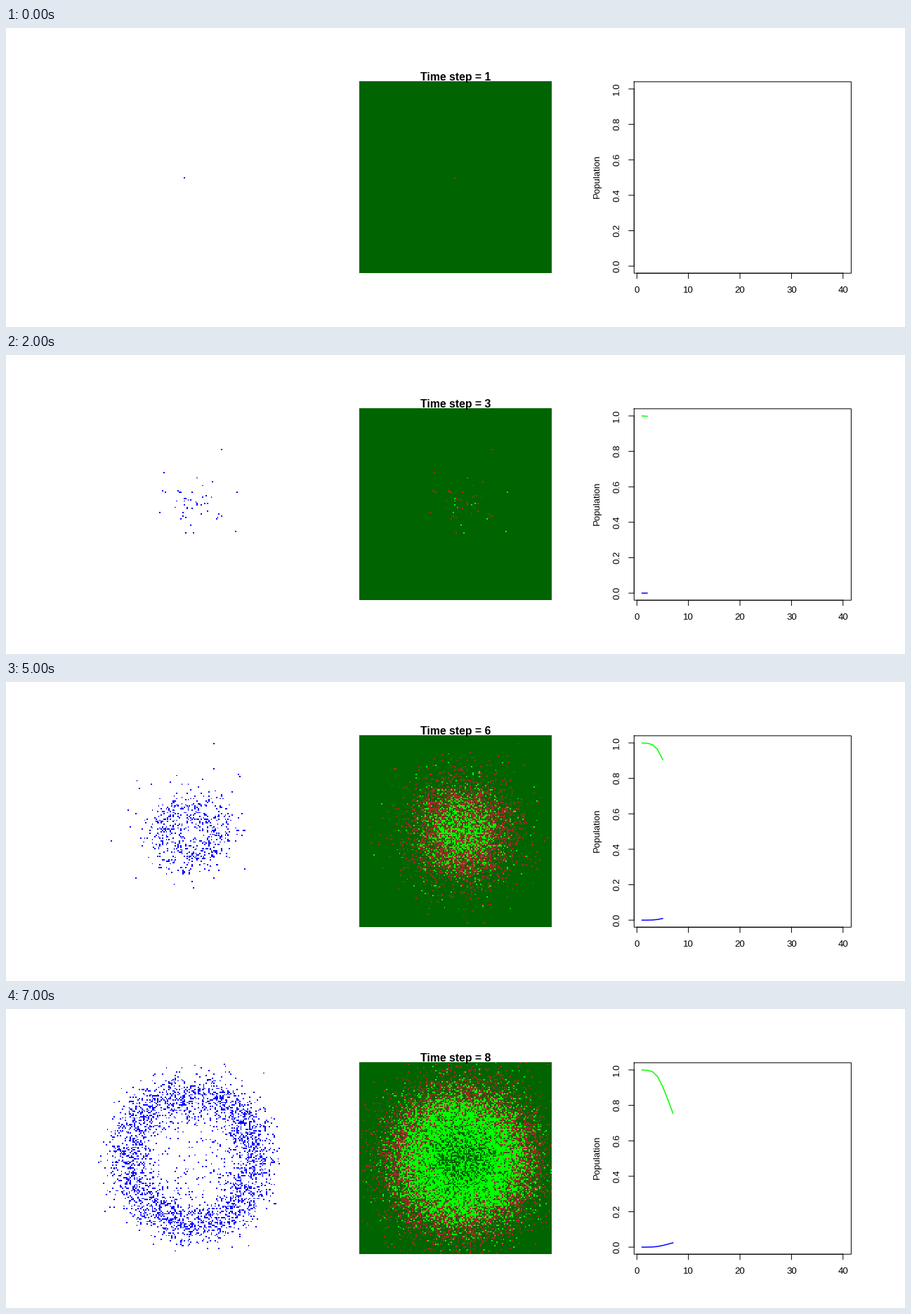
Animation of 1280x427 px, one loop 8 s. Source, as a matplotlib script:

```python
import numpy as np
import matplotlib.pyplot as plt
from matplotlib.animation import FuncAnimation

W, H, DPI = 1280, 427, 64
PT = 72 / DPI                       # points per pixel
STEPS = 8
N, SIDE = 150, 273.4                # cells per side, map side in pixels
BLUE_LEFT, LAND_LEFT, TOP = 117.5, 503.3, 76.8

WHITE, BLUE = (255, 255, 255), (0, 0, 255)
DARK, LIGHT, BROWN = (0, 100, 0), (0, 255, 0), (165, 42, 42)

rng = np.random.default_rng(12)
cells = (np.arange(N) + .5) * SIDE / N
radius = np.hypot(cells[None, :] - 146, cells[:, None] - 138)


def reached(step):
    """Share of cells hit by this step: a soft disc that grows steadily."""
    peak = np.clip(.3 * (step - 3), .2, 1)
    edge = 40 + 21 * (step - 5)
    return peak / (1 + np.exp((radius - edge) / 13))


def first_hits():
    luck = rng.random((N, N))
    hits = 2 + sum(luck > reached(step) for step in range(2, STEPS + 1))
    hits[N // 2, N // 2 - 1] = 1
    return hits


def blue_cells(step):
    """All early hits, later a scattered ring moving outwards."""
    if step < 4:
        return HITS <= step
    age = step - 5
    edge = max(0, 3 + 29 * age)
    offset = ((radius - edge) / 17) ** 2
    density = (.12 + .06 * age) * np.exp(-offset / 2)
    density += .012 * np.exp(-offset / 6) + .035 * (radius < edge)
    return rng.random((N, N)) < density


HITS = first_hits()
BLUES = [blue_cells(step) for step in range(1, STEPS + 1)]


def blue_map(step):
    return np.where(BLUES[step - 1][..., None], BLUE, WHITE).astype(np.uint8)


def land_map(step):
    age = (step - HITS)[..., None]
    land = np.where((age == 1) | (age == 2), LIGHT, DARK)
    return np.where(age == 0, BROWN, land).astype(np.uint8)


def loss(time):
    """Slow start, then an almost constant loss per step."""
    return .0474 * np.log1p(np.exp((time - 3.9) / .6))


def chart_x(time):
    return 898.3 + 7.336 * time


def chart_y(share):
    return 340.1 - 253.1 * share


fig = plt.figure(figsize=(W / DPI, H / DPI), dpi=DPI, facecolor="white")
ax = fig.add_axes([0, 0, 1, 1])
ax.axis("off")


def add_map(left, pixels):
    return ax.imshow(pixels, extent=(left, left + SIDE, TOP + SIDE, TOP),
                     interpolation="nearest", aspect="auto")


def label(x, y, text, size=13.2, **style):
    return ax.text(x, y, text, fontsize=size * PT, family="Liberation Sans",
                   **style)


def stroke(xs, ys):
    ax.plot(xs, ys, color="black", lw=PT, snap=False,
            solid_capstyle="projecting", solid_joinstyle="miter")


def draw_chart_frame():
    left, right, top, bottom = 894.3, 1203.4, TOP, TOP + SIDE
    stroke([left, right, right, left, left], [top, top, bottom, bottom, top])
    stroke([left, left], [chart_y(0), chart_y(1)])
    stroke([chart_x(0), chart_x(40)], [bottom, bottom])
    for time in range(0, 41, 10):
        x = chart_x(time)
        stroke([x, x], [bottom, bottom + 7.5])
        label(x, 378, str(time), ha="center", va="baseline")
    for share in np.arange(6) / 5:
        y = chart_y(share)
        stroke([left - 7.5, left], [y, y])
        label(876, y - .5, f"{share:.1f}", rotation=90, ha="right",
              va="center")
    label(848, 212, "Population", rotation=90, ha="right", va="center")


blue_image = add_map(BLUE_LEFT, blue_map(1))
land_image = add_map(LAND_LEFT, land_map(1))
title = label(640, 75, "", size=15.9, weight="bold", ha="center",
              va="baseline")
draw_chart_frame()
green_line, = ax.plot([], [], color="#00ff00", lw=1.5 * PT)
blue_line, = ax.plot([], [], color="#0000ff", lw=1.5 * PT)
ax.set(xlim=(0, W), ylim=(H, 0))


def draw(index):
    step = index + 1
    blue_image.set_data(blue_map(step))
    land_image.set_data(land_map(step))
    title.set_text(f"Time step = {step}")
    times = np.arange(1, step) if step > 2 else np.array([])
    green_line.set_data(chart_x(times), chart_y(1 - loss(times)))
    blue_line.set_data(chart_x(times), chart_y(loss(times) / 10))
    return blue_image, land_image, title, green_line, blue_line


anim = FuncAnimation(fig, draw, frames=STEPS, interval=1000, repeat=True,
                     repeat_delay=0)
plt.show()
```
